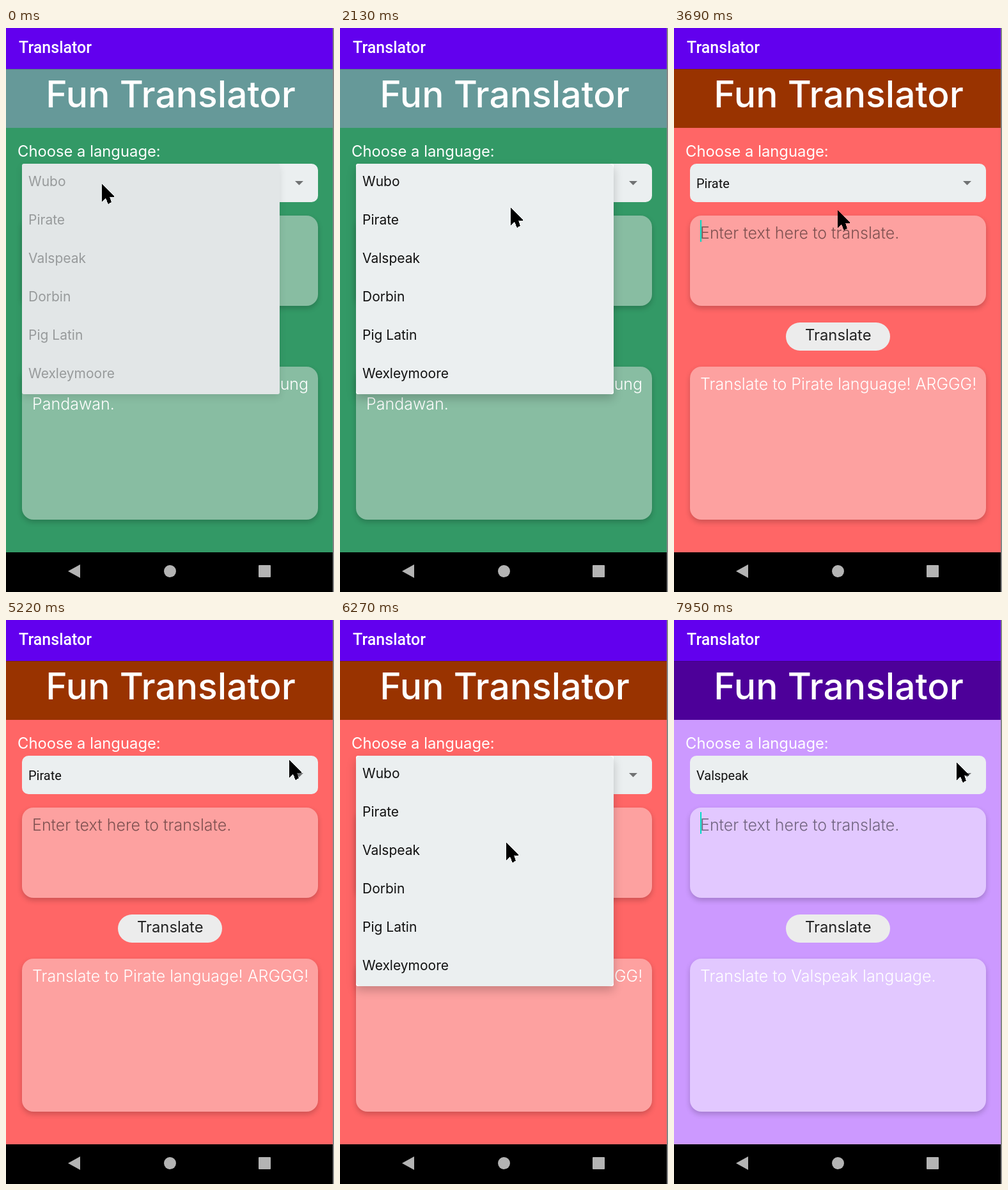
An HTML page that plays this animation: 513x881 px, repeating every 8 s.

```html
<!DOCTYPE html>
<html lang="en">
<head>
<meta charset="utf-8">
<title>Translator</title>
<style>
  html, body { margin: 0; width: 100%; height: 100%; overflow: hidden; background: #858585; }
  #app { position: absolute; width: 513px; height: 881px; overflow: hidden; font: 23.8px/0 Inter, sans-serif; color: #fff; }
  #app div, #app svg { position: absolute; }
  /* "top" of a text is its baseline */
  .t { position: absolute; white-space: nowrap; margin-top: -.364em; }
  .roboto { font-family: Roboto, sans-serif; margin-top: -.342em; }
  .light { left: 41px; font-size: 25px; font-weight: 300; }
  .full { left: 0; width: 511px; }
  #bar { top: 0; height: 64px; background: #6200ee; }
  #page { top: 64px; height: 755px; background: var(--page); }
  #head { top: 64px; height: 91.5px; background: var(--head); box-shadow: inset 0 1px rgba(0, 0, 0, .15); }
  #title { width: 511px; left: 2px; text-align: center; font-size: 57px; font-weight: 500; }
  .card { left: 25px; width: 463px; border-radius: 18px; background: var(--card); box-shadow: 0 4px 9px rgba(0, 0, 0, .2); }
  #spinner { left: 25px; top: 212px; width: 463px; height: 60px; border-radius: 10px; background: #ebeff0; }
  #button { left: 175px; top: 460px; width: 163px; height: 44px; border-radius: 22px; background: #ececec; }
  #caret { left: 41px; top: 300px; width: 2px; height: 34px; background: #03dac5; }
  #popup { left: 25px; top: 212px; width: 403px; height: 360px; border-radius: 3px; background: #fff; color: #111; font-size: 21px; box-shadow: 0 7px 15px rgba(0, 0, 0, .2); }
  #list { inset: 0; border-radius: 7px; background: #ebeff0; overflow: hidden; }
  .row { left: 0; width: 100%; height: 60px; z-index: 0; }
  .row.press { background: #d8dcdd; }
  .row.press::before { content: ""; position: absolute; inset: 0; border-radius: 10px; background: #ebeff0; z-index: -1; }
  #popup.exit { color: #979a9b; background: #e2e6e7; box-shadow: 0 5px 12px rgba(0, 0, 0, .1); }
  #popup.exit #list { background: #e2e6e7; }
  #nav { top: 819px; height: 62px; background: #000; }
</style>
</head>
<body>
<div id="app">
  <div id="page" class="full"></div>
  <div id="bar" class="full"></div>
  <div id="head" class="full"></div>
  <span class="t roboto" style="left:20px;top:40px;font-size:25px;font-weight:500">Translator</span>
  <span class="t" id="title" style="top:125px">Fun Translator</span>
  <span class="t" style="left:18px;top:202px">Choose a language:</span>
  <div id="spinner"></div>
  <span class="t roboto" id="choice" style="left:35px;top:250px;font-size:20px;color:#111"></span>
  <div class="card" style="top:293px;height:141px"></div>
  <span class="t light" style="top:329px;color:rgba(0,0,0,.5)">Enter text here to translate.</span>
  <div id="caret"></div>
  <div id="button"></div>
  <span class="t" style="left:205px;top:489px;color:#222">Translate</span>
  <div class="card" style="top:529px;height:239px"></div>
  <span class="t light" id="line0" style="top:565px"></span>
  <span class="t light" id="line1" style="top:596px"></span>
  <div id="nav" class="full"></div>
  <svg width="513" height="881">
    <path d="M452 239h13l-6.5 6.5z" fill="#707273"/>
    <g fill="#b4b4b4">
      <path d="M97 848.5l19-10.5v21z"/>
      <circle cx="256.5" cy="848.5" r="9.5"/>
      <rect x="395" y="839" width="19" height="19" rx="1"/>
    </g>
  </svg>
  <div id="popup"><div id="list"></div></div>
  <svg width="513" height="881">
    <path id="cursor" d="M0 0L19 19V20H12L15 28L10 31L6 22L0 27Z" shape-rendering="crispEdges"/>
  </svg>
</div>
<script>
const $ = id => document.getElementById(id);
const clamp = v => Math.min(1, Math.max(0, v));
const LOOP = 8000, BLINK = 500, SETTLE = 240;

const languages = ["Wubo", "Pirate", "Valspeak", "Dorbin", "Pig Latin", "Wexleymoore"];

// Each language is picked at a time; its theme stays until the next pick.
const scenes = [
  { pick: -120, page: "#339966", head: "#669999", card: "#88bda2", lines: ["Translate to Wubo's language, young", "Pandawan."] },
  { pick: 3420, page: "#ff6666", head: "#993300", card: "#fda1a0", lines: ["Translate to Pirate language! ARGGG!", ""] },
  { pick: 6960, page: "#cc99ff", head: "#4d0099", card: "#e2c8ff", lines: ["Translate to Valspeak language.", ""] }
];
const opens = [1740, 5490];

// Pointer stops, and the time spent moving to each.
const moves = [
  { from: 200, to: 630, x: 377, y: 223 },
  { from: 1400, to: 1590, x: 464, y: 217 },
  { from: 1740, to: 2250, x: 256, y: 285 },
  { from: 4000, to: 4390, x: 386, y: 224 },
  { from: 5100, to: 5350, x: 464, y: 217 },
  { from: 5350, to: 5610, x: 386, y: 224 },
  { from: 5780, to: 6270, x: 260, y: 348 },
  { from: 7100, to: 7550, x: 442, y: 223 }
];

const rows = languages.map((name, i) => {
  const row = document.createElement("div");
  row.style.top = i * 60 + "px";
  row.innerHTML = `<span class="t" style="left:10px;top:36px">${name}</span>`;
  $("list").append(row);
  return row;
});

function drawPopup(t, sincePick, index) {
  const opened = opens.findLast(start => start <= t) ?? -LOOP;
  const exiting = sincePick >= 100;
  const grow = clamp((t - opened) / SETTLE);
  const popup = $("popup");
  popup.hidden = sincePick >= 250 && opened < t - sincePick;
  popup.className = exiting && opened < t - sincePick ? "exit" : "";
  popup.style.opacity = clamp(.4 + 1.2 * grow);
  popup.style.transform = grow < 1 ? `translate(${1 - grow}px, ${grow - 1}px)` : "none";
  rows.forEach((row, i) => row.className = i === index && !exiting ? "row press" : "row");
}

function drawCursor(t) {
  let x = 150, y = 244;
  for (const move of moves) {
    const k = 1 - (1 - clamp((t - move.from) / (move.to - move.from))) ** 2;
    x += (move.x - x) * k;
    y += (move.y - y) * k;
  }
  $("cursor").setAttribute("transform", `translate(${Math.round(x)} ${Math.round(y)})`);
}

function draw(t) {
  const index = scenes.findLastIndex(scene => scene.pick <= t), scene = scenes[index];
  const sincePick = t - scene.pick;
  for (const part of ["page", "head", "card"]) $("app").style.setProperty("--" + part, scene[part]);
  $("choice").textContent = languages[index];
  scene.lines.forEach((line, i) => $("line" + i).textContent = line);
  $("caret").hidden = Math.floor((sincePick + 60) / BLINK) % 2 === 1;
  drawPopup(t, sincePick, index);
  drawCursor(t);
}

const begin = performance.now();
function tick() {
  draw((performance.now() - begin) % LOOP);
  requestAnimationFrame(tick);
}
tick();
</script>
</body>
</html>
```
